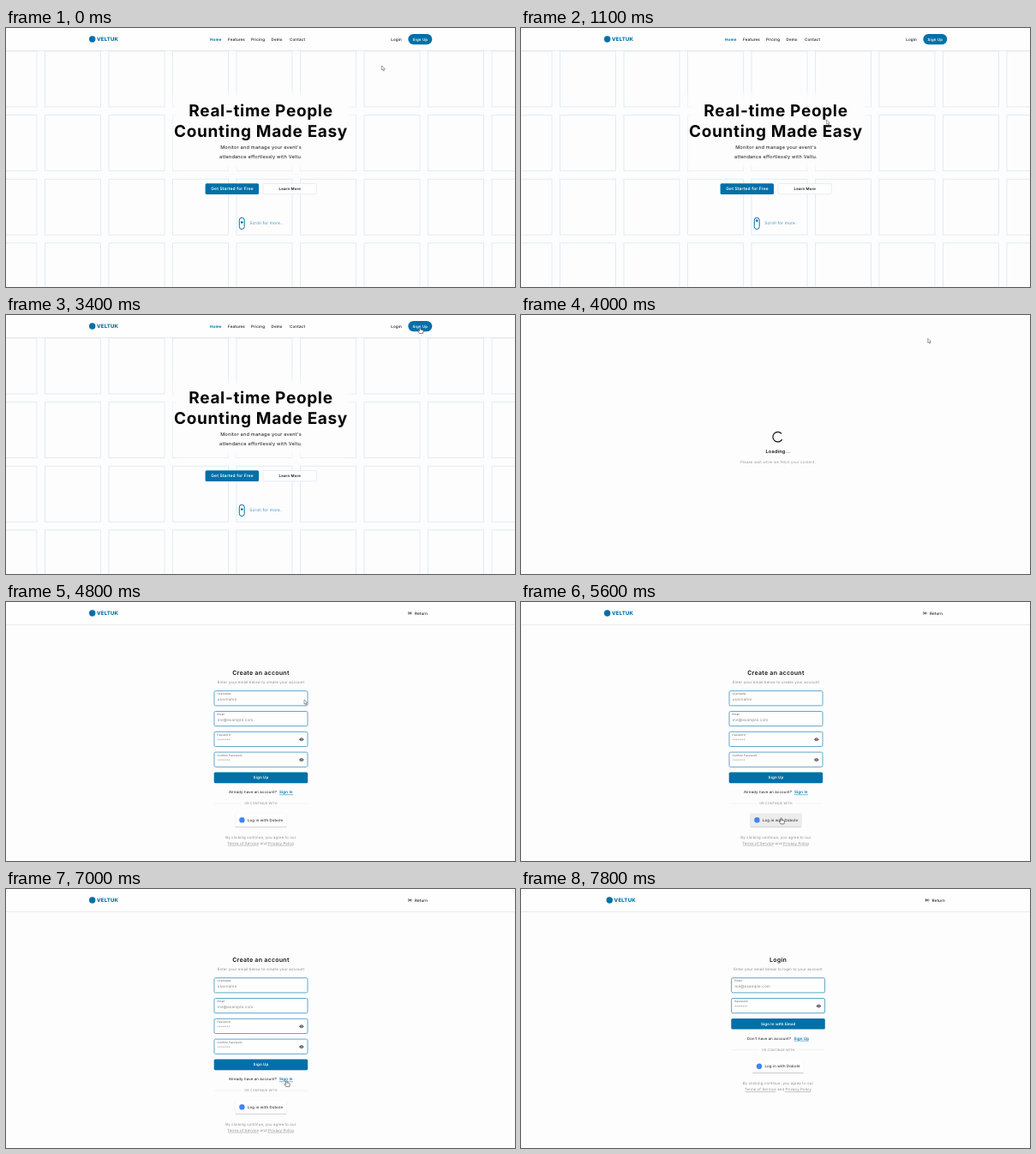
An HTML page for the animation above (8 s loop, 594 by 302 pixels).

```html
<!DOCTYPE html>
<html lang="en">
<head>
<meta charset="utf-8">
<title>Landing page and sign-up flow</title>
<style>
html, body { margin: 0; width: 100%; height: 100%; overflow: hidden; background: #fdfdfe; }
svg { display: block; width: 594px; height: 302px; }
text {
  font-family: Inter, "Open Sans", sans-serif;
  letter-spacing: .035em;
  text-rendering: geometricPrecision;
  white-space: pre;
}
</style>
</head>
<body>
<svg id="stage" viewBox="0 0 594 302" xmlns="http://www.w3.org/2000/svg">
  <defs>
    <filter id="soft" x="-20%" y="-20%" width="140%" height="140%"><feGaussianBlur stdDeviation="4"/></filter>
    <filter id="lift" x="-10%" y="-20%" width="120%" height="150%">
      <feDropShadow dx="0" dy=".6" stdDeviation=".7" flood-color="#000" flood-opacity=".32"/>
    </filter>
  </defs>
  <g id="home"></g>
  <g id="loading"></g>
  <g id="signup"></g>
  <g id="login" transform="translate(2.6 0)"></g>
  <path id="arrow" d="M0 0V5.1L1.2 4.1 2 6 2.9 5.6 2.1 3.8H3.7Z" fill="#fff" stroke="#555" stroke-width=".55" stroke-linejoin="round"/>
  <path id="hand" d="M-.7 .4Q0-.5 .7 .4V2.6L3.4 3.2Q4 3.4 3.9 4.2L3.4 7H-.6L-2.4 4.2Q-2.3 3.3-1.5 3.7L-.7 4.4Z" fill="#fff" stroke="#333" stroke-width=".6" stroke-linejoin="round"/>
</svg>
<script>
const LOOP = 8000, STEP = 100;
const BLUE = '#0070a8', INK = '#151515', GREY = '#8b8b8b', EDGE = '#4d9ec4';
const $ = id => document.getElementById(id);

const text = (x, y, size, str, { w = 400, fill = INK, anchor = 'start' } = {}) =>
  `<text x="${x}" y="${y}" font-size="${size}" font-weight="${w}" fill="${fill}" text-anchor="${anchor}">${str}</text>`;
const mid = (x, y, size, str, opts) => text(x, y, size, str, { ...opts, anchor: 'middle' });
const rect = (x, y, w, h, r, fill, extra = '') =>
  `<rect x="${x}" y="${y}" width="${w}" height="${h}" rx="${r}" fill="${fill}" ${extra}/>`;
const line = (x1, x2, y, color, w = .5) =>
  `<path d="M${x1} ${y}H${x2}" stroke="${color}" stroke-width="${w}"/>`;

const header = () =>
  rect(-5, 0, 604, 26.5, 0, '#fefefe') + line(-5, 599, 26.6, '#dfe3e6', .7) +
  `<circle cx="100.7" cy="13" r="3.7" fill="${BLUE}"/>` +
  text(106, 15.2, 6, 'VELTUK', { w: 800, fill: BLUE });

function homePage() {
  let grid = '';
  for (let row = 0; row < 4; row++)
    for (let col = 0; col < 9; col++)
      grid += rect(-29 + col * 74.5, 27 + row * 74.6, 65, 65, 0, 'none', 'stroke="#dcebf3" stroke-width=".9"');
  const nav = [[238, 'Home'], [259, 'Features'], [286, 'Pricing'], [309.5, 'Demo'], [331, 'Contact']];
  return grid +
    rect(194, 76, 210, 88, 4, '#fdfdfe', 'filter="url(#soft)"') +
    header() +
    nav.map(([x, s], i) => text(x, 14.6, 4.5, s, i ? { w: 500 } : { w: 700, fill: BLUE })).join('') +
    text(449.3, 14.6, 4.5, 'Login', { w: 500 }) +
    rect(469.3, 7, 28, 12.2, 6.1, BLUE) + mid(483.4, 14.6, 4.4, 'Sign Up', { w: 600, fill: '#fff' }) +
    mid(297.5, 103.4, 19, 'Real-time People', { w: 700, fill: '#050505' }) +
    mid(297.5, 127.2, 19, 'Counting Made Easy', { w: 700, fill: '#050505' }) +
    mid(297.5, 141.4, 5.6, 'Monitor and manage your event\'s') +
    mid(297.5, 152.3, 5.6, 'attendance effortlessly with Veltu.') +
    rect(232.6, 181.2, 62.4, 12.8, 1.5, BLUE) +
    mid(264, 189.4, 4.85, 'Get Started for Free', { w: 600, fill: '#fff' }) +
    rect(300, 181.4, 62.4, 12.4, 1.5, '#fefefe', 'stroke="#dce9f1" stroke-width=".7"') +
    mid(331.3, 189.3, 4.35, 'Learn More', { w: 600 }) +
    rect(272.3, 221.2, 5.9, 13.4, 2.95, '#fefefe', `stroke="${BLUE}" stroke-width="1"`) +
    `<circle id="dot" cx="275.25" r="1.35" fill="${BLUE}"/>` +
    text(284.2, 229.4, 4.8, 'Scroll for more..', { fill: '#3a92bf' });
}

const loadingPage = () =>
  `<path id="spinner" d="M5 3A5.8 5.8 0 1 1 4.4-3.8" fill="none" stroke="${INK}" stroke-width="1.2"/>` +
  mid(300, 160.6, 5.6, 'Loading...', { w: 600 }) +
  mid(300, 172.9, 4.3, 'Please wait while we fetch your content.', { fill: '#999' });

function field(y, label, hint) {
  const value = hint
    ? text(246.8, y + 11.6, 4.5, hint, { fill: GREY })
    : `<path d="M247.6 ${y + 9}h13.2" stroke="#777" stroke-width="1" stroke-linecap="round" stroke-dasharray="0 1.85"/>` +
      `<path d="M342 ${y + 9}q2.8-4 5.6 0q-2.8 4-5.6 0z" fill="#444"/>` +
      `<circle cx="344.8" cy="${y + 9}" r="1.1" fill="#444" stroke="#fff" stroke-width=".5"/>`;
  return rect(243, y, 109, 17.2, 1.6, '#fefefe', `stroke="${EDGE}" stroke-width=".9"`) +
    text(246.6, y + 4.5, 3.1, label, { fill: '#555' }) + value;
}

function formPage({ title, note, fields, action, ask, link, askX, linkX, linkEnd }) {
  const end = 103.7 + fields.length * 23.8;
  const at = y => end + y - 198.9;
  const under = (x1, x2, y, c) => line(x1, x2, at(y), c, .5);
  return header() +
    `<path d="M474 13h-3m1.4-1.5-1.5 1.5 1.5 1.5M469.9 11.3v3.4" fill="none" stroke="${INK}" stroke-width=".7"/>` +
    text(477, 14.6, 4.5, 'Return', { w: 500 }) +
    mid(297.4, 84.7, 7.05, title, { w: 600 }) +
    mid(297.4, 94.5, 4.35, note, { fill: GREY }) +
    fields.map(([label, hint], i) => field(103.7 + i * 23.8, label, hint)).join('') +
    rect(242.7, at(198.6), 109.5, 12.6, 1.6, BLUE) +
    mid(297.5, at(206.4), 4.45, action, { w: 600, fill: '#fff' }) +
    text(askX, at(223.4), 4.3, ask) +
    text(linkX, at(223.4), 4.45, link, { w: 600, fill: BLUE }) +
    under(linkX, linkEnd, 224.7, BLUE) +
    under(243, 275, 235, '#e4e4e4') + under(320, 352, 235, '#e4e4e4') +
    mid(297.5, at(236.3), 3.7, 'OR CONTINUE WITH', { fill: GREY }) +
    rect(267.5, at(246.5), 59.8, 15.2, .8, '#fefefe', 'class="social" filter="url(#lift)"') +
    `<circle cx="275.4" cy="${at(254.3)}" r="3.2" fill="#4285f4"/>` +
    text(281.9, at(255.9), 4.35, 'Log in with Dobole', { w: 500, fill: '#333' }) +
    mid(297.4, at(275.9), 4.3, 'By clicking continue, you agree to our', { fill: GREY }) +
    mid(297.4, at(282.5), 4.3, 'Terms of Service and Privacy Policy', { fill: GREY }) +
    under(259, 294.5, 284, GREY) + under(305.3, 335.3, 284, GREY);
}

$('home').innerHTML = homePage();
$('loading').innerHTML = loadingPage();
$('signup').innerHTML = formPage({
  title: 'Create an account', note: 'Enter your email below to create your account',
  fields: [['Username', 'username'], ['Email', 'me@example.com'], ['Password'], ['Confirm Password']],
  action: 'Sign Up', ask: 'Already have an account?', link: 'Sign In', askX: 260, linkX: 319, linkEnd: 335
});
$('login').innerHTML = formPage({
  title: 'Login', note: 'Enter your email below to login to your account',
  fields: [['Email', 'me@example.com'], ['Password']],
  action: 'Sign In with Email', ask: 'Don\'t have an account?', link: 'Sign Up', askX: 261.4, linkX: 315.8, linkEnd: 333.4
});

// [start time, page]
const scenes = [[0, 'home'], [3900, 'loading'], [4500, 'signup'], [7100, 'loading'], [7400, 'login']];
// [time, x, y] of the pointer tip
const path = [
  [0, 438.6, 44], [300, 485, 14], [600, 455, 48], [1000, 366, 99], [1100, 356.6, 107],
  [1400, 385, 122], [1800, 443, 90], [2600, 434.6, 73.4], [2800, 453, 53], [3200, 484, 14],
  [3700, 482, 15], [4000, 474.8, 27.3], [4500, 430, 50], [4800, 348, 114], [5400, 303.6, 251.8],
  [5700, 303.6, 251.8], [6400, 325.6, 222.4], [6700, 327.4, 223.4], [LOOP, 327.4, 223.4]
];

function pointerAt(t) {
  const i = path.findIndex(p => p[0] > t);
  const [t0, x0, y0] = path[i - 1], [t1, x1, y1] = path[i];
  const k = (t - t0) / (t1 - t0);
  return [x0 + (x1 - x0) * k, y0 + (y1 - y0) * k];
}

const social = document.querySelector('#signup .social');
const show = (id, on) => { $(id).style.display = on ? '' : 'none'; };

function draw(now) {
  const t = Math.floor(now % LOOP / STEP) * STEP;
  const page = scenes.filter(s => s[0] <= t).pop()[1];
  for (const id of ['home', 'loading', 'signup', 'login']) show(id, id === page);

  $('dot').setAttribute('cy', 227.7 - 3.7 * Math.cos(2 * Math.PI * (t - 1200) / 1000));
  $('spinner').setAttribute('transform', `translate(299.7 142.1) rotate(${(t - 4000) * .5})`);

  const [x, y] = pointerAt(t);
  const onSocial = page === 'signup' && x > 267 && x < 327 && y > 246 && y < 262;
  const onLink = page === 'signup' && x > 319 && x < 335 && y > 219 && y < 226;
  const onPill = page === 'home' && x > 469 && x < 497 && y > 7 && y < 19;
  const hand = onSocial || onLink || onPill;
  social.setAttribute('fill', onSocial ? '#ececec' : '#fefefe');
  for (const id of ['arrow', 'hand']) $(id).setAttribute('transform', `translate(${x} ${y})`);
  show('hand', hand && page !== 'login');
  show('arrow', !hand && page !== 'login');
}

const start = performance.now();
function tick() {
  draw(performance.now() - start);
  requestAnimationFrame(tick);
}
tick();
</script>
</body>
</html>
```
